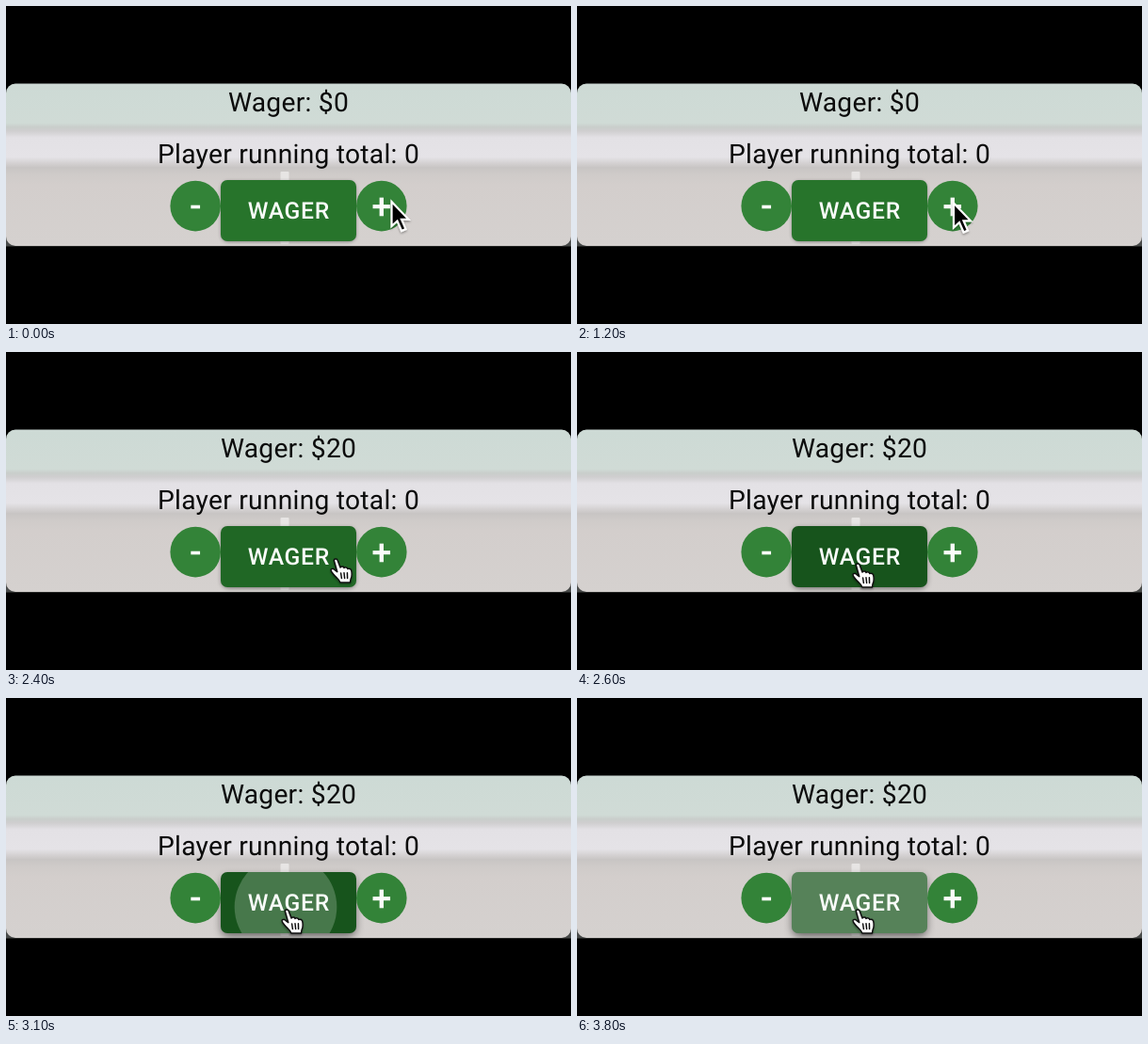
Animation, 600 px wide and 338 px high, one loop 3900 ms. Source, as an HTML page:

```html
<!DOCTYPE html>
<html lang="en">
<head>
<meta charset="utf-8">
<title>Wager controls</title>
<style>
  html, body { margin: 0; width: 100%; height: 100%; overflow: hidden; background: #000; }
  svg { display: block; width: 100vw; height: 100vh; }
  text { font-family: Roboto, sans-serif; text-anchor: middle; text-rendering: geometricPrecision; }
  .label { font-size: 28.2px; letter-spacing: .265px; fill: #0b0b0b; }
  .caps { font-size: 24.7px; font-weight: 500; letter-spacing: .7px; fill: #fafcfa; }
  .sign { font-size: 38px; font-weight: 500; fill: #fafcfa; }
</style>
</head>
<body>
<svg viewBox="0 0 600 338">
  <defs>
    <linearGradient id="wall" gradientUnits="userSpaceOnUse" x1="0" y1="83" x2="0" y2="255">
      <stop offset="0" stop-color="#cddad5"/>
      <stop offset=".24" stop-color="#d0dbd6"/>
      <stop offset=".265" stop-color="#c9cecb"/>
      <stop offset=".29" stop-color="#cfcecf"/>
      <stop offset=".33" stop-color="#e3e1e5"/>
      <stop offset=".45" stop-color="#e5e3e7"/>
      <stop offset=".485" stop-color="#d6d3d4"/>
      <stop offset=".515" stop-color="#c8c5c4"/>
      <stop offset=".56" stop-color="#cfcbc9"/>
      <stop offset=".62" stop-color="#d3cecc"/>
      <stop offset="1" stop-color="#d5d1cf"/>
    </linearGradient>
    <clipPath id="face"><rect x="228" y="185" width="144" height="65" rx="7"/></clipPath>
    <filter id="blur" x="-20%" y="-40%" width="140%" height="180%">
      <feGaussianBlur id="soft" stdDeviation="2"/>
    </filter>
    <filter id="drop" x="-40%" y="-40%" width="180%" height="180%">
      <feDropShadow dx="0" dy="1.5" stdDeviation="1.2" flood-opacity=".35"/>
    </filter>
    <clipPath id="card"><rect y="82.5" width="600" height="172.5" rx="10"/></clipPath>
  </defs>

  <rect width="600" height="338"/>
  <rect y="244" width="600" height="11.5" fill="#484a49"/>
  <g clip-path="url(#card)">
    <rect y="82" width="600" height="174" fill="url(#wall)"/>
    <rect x="291.5" y="176" width="9" height="77" rx="1" fill="#e7e5e4"/>
    <rect id="shade" x="229" y="187" width="142" height="63" rx="7" filter="url(#blur)"/>
  </g>

  <text class="label" id="wager" x="300" y="112"></text>
  <text class="label" x="300" y="167">Player running total: 0</text>

  <g fill="#338338">
    <circle cx="201.2" cy="212.6" r="26.8"/>
    <circle cx="398.8" cy="212.6" r="26.8"/>
  </g>
  <text class="sign" x="201.2" y="225">-</text>
  <text class="sign" x="398.8" y="225.5">+</text>

  <g clip-path="url(#face)">
    <rect id="button" x="228" y="185" width="144" height="65"/>
    <circle id="ripple" cx="297" cy="222" fill="#fff"/>
  </g>
  <text class="caps" x="300.3" y="226">WAGER</text>

  <g id="arrow" filter="url(#drop)">
    <path d="M0 0V26L6 20.5L10.6 31L15 29.1L10.5 18.8H18Z" fill="#060606" stroke="#fff" stroke-width="2.2"/>
  </g>
  <g id="hand" filter="url(#drop)" stroke="#111" stroke-width="1.5" stroke-linecap="round" stroke-linejoin="round">
    <path fill="#fff" d="M4.5 2.6C3.8 .4 7.2-.4 8.2 2L11 9.5C12 8 14.5 8.2 15 10C16.3 8.8 18.4 9.4 18.8 11C20.4 10.2 22.4 11.2 22.8 13C23.4 16 23.6 18.5 22.2 21.5L21.4 25.5H11C9.5 22 6.5 20 4 17C1.8 14.5 .4 13 1.2 11.6C2.2 10.3 4.4 11 6 13L7.8 14.2Z"/>
    <path fill="none" d="M11.6 15.5L12.4 21M15 15.2L15.6 21M18.4 15.2L18.6 21"/>
  </g>
</svg>
<script>
  const LOOP = 3900, STEP = 100;
  const $ = id => document.getElementById(id);
  const clamp = v => Math.min(1, Math.max(0, v));
  const mix = (a, b, p) => a + (b - a) * p;
  const progress = (t, start, length) => clamp((t - start) / length);

  // CSS cubic-bezier(.4, 0, .2, 1)
  function ease(x) {
    let lo = 0, hi = 1;
    for (let i = 0; i < 20; i++) {
      const m = (lo + hi) / 2, n = 1 - m;
      if (1.2 * n * n * m + 0.6 * n * m * m + m ** 3 < x) lo = m; else hi = m;
    }
    return 3 * (1 - lo) * lo * lo + lo ** 3;
  }

  // [time, x, y]
  const arrowPath = [[0, 409.5, 208], [600, 404.5, 208.8], [700, 404.5, 208.8], [1200, 400, 209.5], [2200, 400, 209.5], [2300, 390, 212]];
  const handPath = [[2400, 344, 219.5], [2500, 312, 222.5], [2600, 292, 224.5]];

  function along(path, t) {
    const i = path.findIndex(k => k[0] > t);
    if (i < 0) return path[path.length - 1].slice(1);
    if (i === 0) return path[0].slice(1);
    const a = path[i - 1], b = path[i], p = (t - a[0]) / (b[0] - a[0]);
    return [mix(a[1], b[1], p), mix(a[2], b[2], p)];
  }

  function place(id, path, t, shown) {
    $(id).setAttribute('transform', `translate(${along(path, t)})`);
    $(id).style.display = shown ? '' : 'none';
  }

  const rest = [39, 116, 43], dark = [23, 84, 28];

  function draw(t) {
    const onButton = t >= 2400;
    $('wager').textContent = 'Wager: $' + (t < 1500 ? 0 : t < 2000 ? 10 : 20);
    place('arrow', arrowPath, t, !onButton);
    place('hand', handPath, t, onButton);

    const hover = ease(progress(t, 2320, 250));
    const press = ease(progress(t, 2875, 250));
    $('button').setAttribute('fill', `rgb(${rest.map((c, i) => Math.round(mix(c, dark[i], hover)))})`);
    $('soft').setAttribute('stdDeviation', 2 + hover + 2 * press);
    $('shade').setAttribute('y', 187 + hover + 2 * press);
    $('shade').setAttribute('opacity', 0.55);

    const grow = ease(progress(t, 2875, 550));
    $('ripple').setAttribute('r', 86 * grow);
    $('ripple').setAttribute('opacity', grow ? mix(0.1, 0.27, grow) : 0);
  }

  const begin = performance.now();
  function tick() {
    const t = (performance.now() - begin) % LOOP;
    draw(Math.floor(t / STEP) * STEP);
    requestAnimationFrame(tick);
  }
  tick();
</script>
</body>
</html>
```
